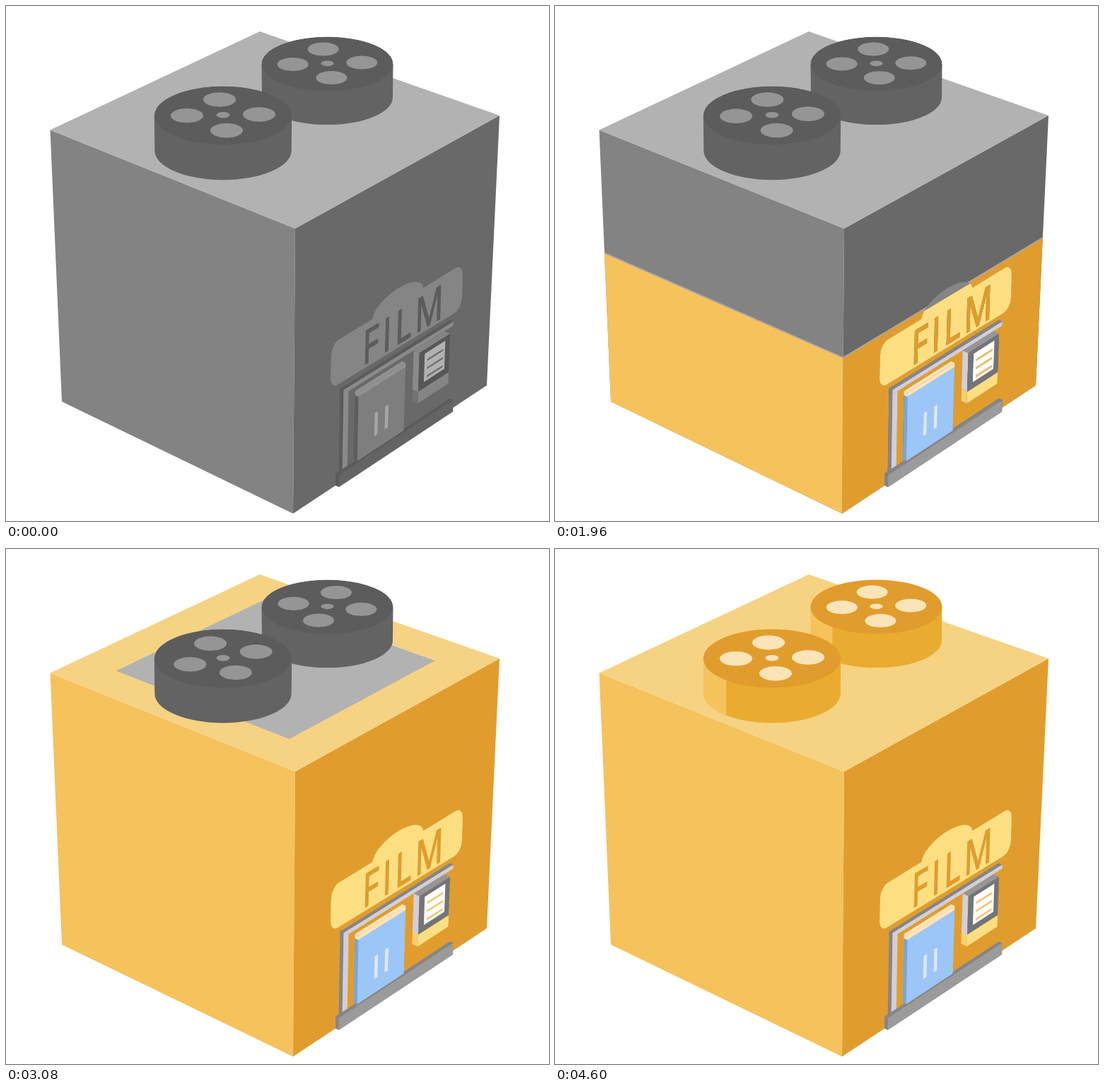
Recreate the animation shown at these times as an HTML page with a canvas. Size 768 by 729 pixels, loop 4.8 s.

```html
<!DOCTYPE html>
<html lang="en">
<head>
<meta charset="utf-8">
<title>Film block</title>
<style>
  html, body { margin: 0; width: 100%; height: 100%; overflow: hidden; background: #fff; }
  canvas { display: block; }
</style>
</head>
<body>
<canvas id="stage" width="768" height="729"></canvas>
<script>
const ctx = document.getElementById('stage').getContext('2d');

const LOOP = 4800, STEP = 40, LAST = 4600;
const GOLD = '#f6c25c', AMBER = '#e09d2d', BUTTER = '#fddf82', CREAM = '#fce4b9';

// Vertical edges of the cube and the hidden rear corner of its roof.
const LEFT = { top: [62.5, 175.5], bottom: [79, 560] };
const CORNER = { top: [409, 315], bottom: [406, 718.5] };
const RIGHT = { top: [698, 155], bottom: [680, 537] };
const REAR = [359, 36];
const ROOF_CENTRE = [382, 165.5];

// The right wall measured in its own units, from the front corner at the floor.
const WALL = { width: 430, height: 400 };

const REELS = [
  { x: 454.5, y: 82, rx: 93, ry: 38.5, phase: -5.2, spin: 1 },
  { x: 307, y: 155, rx: 97.2, ry: 41.5, phase: -3.9, spin: -1 }
];

// Each pair is the grey tone and the coloured tone.
const TONE = {
  sign: ['#858585', BUTTER],
  letters: ['#5c5c5c', AMBER],
  trim: ['#5b5b5b', '#858589'],
  post: ['#8a8a8a', '#d2cfda'],
  step: ['#646464', '#9b9b9b'],
  door: ['#7e7e7e', '#9cc6f8'],
  doorSide: ['#5d5d5d', '#71a8e0'],
  lintel: ['#919191', CREAM],
  handle: ['#a6a6a6', '#e3e6f2'],
  frame: ['#575757', '#747479'],
  frameTop: ['#848484', '#95959a'],
  paper: ['#b2b2b2', '#ffffff'],
  print: ['#707070', GOLD],
  shelfSide: ['#737373', '#f4d071']
};

const clamp = v => Math.max(0, Math.min(1, v));
const progress = (t, from, to) => clamp((t - from) / (to - from));
const smooth = u => u * u * (3 - 2 * u);
const mix = (a, b, u) => a.map((v, i) => v + (b[i] - v) * u);

// Share of the wall's screen height that is coloured, with foreshortening.
let level = 0;
const foreshorten = u => 0.895 * u / (1 - 0.105 * u);
const levelLine = () => [LEFT, CORNER, RIGHT].map(e => mix(e.bottom, e.top, level));

function trace(points) {
  ctx.beginPath();
  points.forEach(p => ctx.lineTo(...p));
  ctx.closePath();
}

function fill(points, color) {
  trace(points);
  ctx.fillStyle = color;
  ctx.fill();
}

function ellipse(x, y, rx, ry) {
  ctx.beginPath();
  ctx.ellipse(x, y, rx, ry, 0, 0, Math.PI * 2);
}

function clipped(path, draw) {
  ctx.save();
  path();
  ctx.clip();
  draw();
  ctx.restore();
}

// Paints in grey, then again in colour below the level.
function paint([grey, color], depth, draw) {
  draw(level < 1 ? grey : color);
  if (level <= 0 || level >= 1) return;
  const [, a, b] = levelLine().map(([x, y]) => [x, y + depth + 2]);
  clipped(() => trace([a, b, [768, b[1]], [768, 729], [a[0], 729]]), () => draw(color));
}

// Screen position of a wall point standing out from the wall by depth.
function wallPoint(x, y, depth = 0) {
  const floor = mix(CORNER.bottom, RIGHT.bottom, x / WALL.width);
  const eaves = mix(CORNER.top, RIGHT.top, x / WALL.width);
  const [px, py] = mix(floor, eaves, y / WALL.height);
  return [px + depth, py + depth * 0.42];
}

function panel(x0, x1, y0, y1, depth, tone) {
  const corners = [[x0, y0], [x1, y0], [x1, y1], [x0, y1]];
  paint(tone, depth, c => fill(corners.map(p => wallPoint(...p, depth)), c));
}

function box(x0, x1, y0, y1, depth, front, side, top) {
  const face = (a, b, tone) => paint(tone, depth, c => fill([
    wallPoint(...a), wallPoint(...b), wallPoint(...b, depth), wallPoint(...a, depth)], c));
  face([x0, y0], [x0, y1], side);
  face([x0, y1], [x1, y1], top);
  panel(x0, x1, y0, y1, depth, front);
}

// Draws flat on the wall around x, y, in wall units with y pointing down.
function onWall(x, y, draw) {
  const o = wallPoint(x, y), across = wallPoint(x + 1, y), down = wallPoint(x, y - 1);
  ctx.save();
  ctx.transform(across[0] - o[0], across[1] - o[1], down[0] - o[0], down[1] - o[1], ...o);
  ctx.translate(-x, y);
  draw();
  ctx.restore();
}

function sign() {
  paint(TONE.sign, 1, color => onWall(222, 174, () => {
    ctx.fillStyle = color;
    ctx.beginPath();
    ctx.roundRect(80, -207, 285, 65, 16);
    ctx.fill();
    ctx.beginPath();
    ctx.ellipse(224, -206, 55, 23, 0, Math.PI, 0);
    ctx.fill();
  }));
  paint(TONE.letters, 1, color => onWall(222, 174, () => {
    ctx.font = '67px "Open Sans", "Noto Sans", sans-serif';
    ctx.letterSpacing = '8.5px';
    ctx.fillStyle = ctx.strokeStyle = color;
    ctx.lineWidth = 2;
    ctx.fillText('FILM', 149.5, -147);
    ctx.strokeText('FILM', 149.5, -147);
  }));
}

function entrance() {
  const { trim, post, step, door, doorSide, lintel, handle } = TONE;
  box(101, 112, 17, 135, 5, post, trim, trim);
  box(101, 340, 129, 135, 5, post, trim, trim);
  box(94, 347, 0, 17, 5, step, trim, trim);
  box(134, 237, 20, 112, 5, door, doorSide, lintel);
  box(134, 237, 112, 118, 5, lintel, lintel, lintel);
  for (const x of [171, 194]) panel(x, x + 7, 40, 73, 5, handle);
}

function poster() {
  const { frame, frameTop, post, sign, shelfSide, paper, print } = TONE;
  box(262, 329, 50, 67, 8, sign, shelfSide, sign);
  box(262, 329, 67, 123, 8, frame, post, frameTop);
  panel(274, 319, 76, 117, 8, paper);
  for (let i = 0; i < 3; i++) panel(280, 315, 104 - 12 * i, 107 - 12 * i, 8, print);
}

function cube() {
  const [a, b, c] = levelLine();
  const faces = (l, m, r, light, dark) => {
    fill([l, m, CORNER.bottom, LEFT.bottom], light);
    fill([m, r, RIGHT.bottom, CORNER.bottom], dark);
  };
  if (level < 1) faces(LEFT.top, CORNER.top, RIGHT.top, '#838383', '#696969');
  if (level > 0) faces(a, b, c, GOLD, AMBER);
  if (level <= 0 || level >= 1) return;
  ctx.beginPath();
  [a, b, c].forEach(p => ctx.lineTo(...p));
  ctx.strokeStyle = '#aaa7ad';
  ctx.lineWidth = 2.4 - level;
  ctx.stroke();
}

function roof(t) {
  const corners = [LEFT.top, REAR, RIGHT.top, CORNER.top];
  const rest = 1 - progress(t, 2820, 3715);
  fill(corners, rest < 1 ? '#f6d283' : '#b2b2b2');
  if (rest === 0 || rest === 1) return;
  const inset = p => {
    const farther = (ROOF_CENTRE[1] - p[1]) / 150;
    return mix(ROOF_CENTRE, p, rest * (1 + 0.085 * farther * (1 - rest)));
  };
  fill(corners.map(inset), '#b2b2b2');
}

function reelSide({ x, y, rx, ry }, base) {
  ctx.beginPath();
  ctx.moveTo(x - rx, y);
  ctx.ellipse(x, base, rx - 0.5, ry, 0, Math.PI, 0, true);
  ctx.lineTo(x + rx, y);
  ctx.closePath();
}

function reelCap({ x, y, rx, ry, phase, spin }, turn, capColor, holeColor) {
  const hole = (hx, hy, size) => {
    ellipse(hx, hy, rx * size, ry * size * 1.04);
    ctx.fill();
  };
  ellipse(x, y, rx, ry);
  ctx.fillStyle = capColor;
  ctx.fill();
  ctx.fillStyle = holeColor;
  for (let k = 0; k < 4; k++) {
    const skew = k % 2 ? 1.7 : -1.7;
    const a = (90 * k + phase + skew + spin * turn) * Math.PI / 180;
    hole(x + rx * 0.525 * Math.sin(a), y - 0.7 - ry * 0.53 * Math.cos(a), 0.237);
  }
  hole(x, y - 0.7, 0.097);
}

function reel(r, t) {
  const turn = 1800 * smooth(progress(t, 0, 4520));
  const side = progress(t, 3580, 4090);
  const greyCap = 1 - progress(t, 4090, 4590);
  const base = r.y + r.rx * 0.512;
  if (side > 0) {
    clipped(() => reelSide(r, base), () => {
      ctx.fillStyle = '#e9ac30';
      ctx.fillRect(r.x - r.rx, r.y, r.rx * 2, r.rx);
      ctx.fillStyle = GOLD;
      ctx.fillRect(r.x - r.rx, r.y, r.rx / 3, r.rx);
    });
  }
  if (side < 1) {
    reelSide(r, base + (r.y - base) * side);
    ctx.fillStyle = '#636363';
    ctx.fill();
  }
  if (greyCap < 1) reelCap(r, turn, AMBER, CREAM);
  if (greyCap > 0) {
    clipped(() => ellipse(r.x, r.y, r.rx * greyCap, r.ry * greyCap),
            () => reelCap(r, turn, '#5c5c5c', '#959595'));
  }
}

function render(t) {
  ctx.fillStyle = '#fff';
  ctx.fillRect(0, 0, 768, 729);
  level = foreshorten(progress(t, 800, 2820));
  cube();
  roof(t);
  REELS.forEach(r => reel(r, t));
  sign();
  entrance();
  poster();
}

function tick() {
  const t = performance.now() % LOOP;
  render(Math.min(LAST, Math.floor(t / STEP) * STEP));
  requestAnimationFrame(tick);
}
tick();
</script>
</body>
</html>
```
